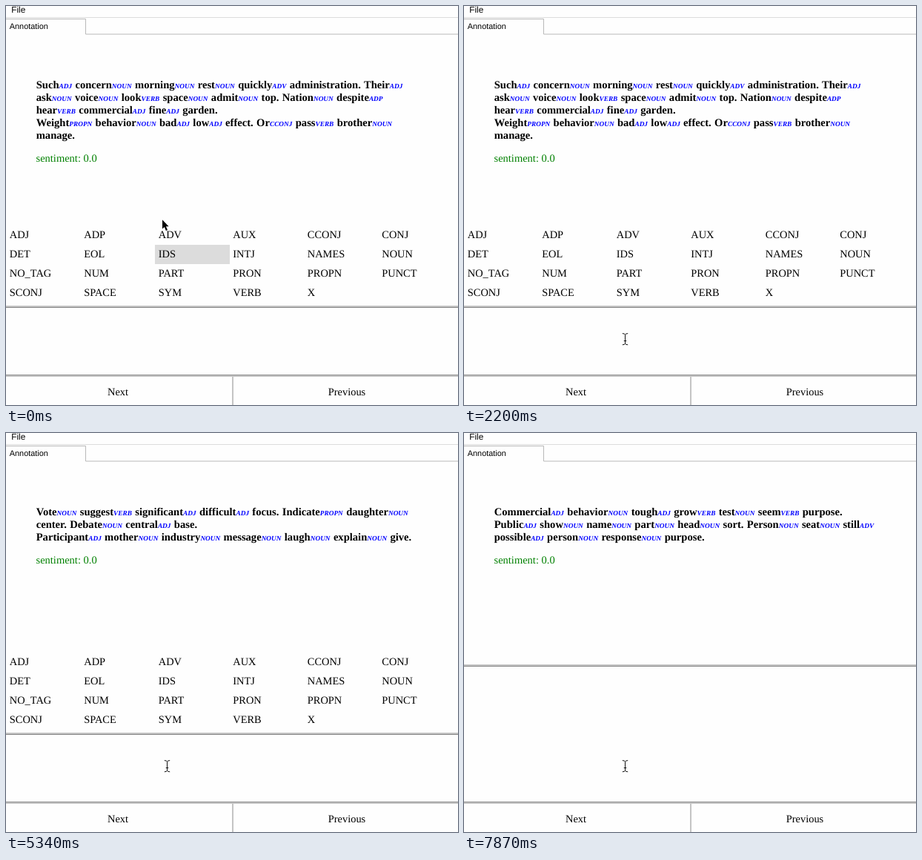
Animation, 610 px wide and 538 px high, one loop 8000 ms. Source, as an HTML page:

```html
<!DOCTYPE html>
<html lang="en">
<head>
<meta charset="utf-8">
<title>Annotation</title>
<style>
  html, body { margin: 0; width: 100%; height: 100%; overflow: hidden; background: #fefefe; }
  svg { display: block; width: 610px; height: 538px; }
  text { font-family: "Liberation Serif", Times, serif; font-size: 14.4px; white-space: pre; text-rendering: geometricPrecision; }
  .ui { font-family: "Liberation Sans", Arial, sans-serif; }
  .doc { font-size: 14.6px; font-weight: bold; word-spacing: .65px; }
  .tag { font-size: 9.3px; font-style: italic; fill: #00f; }
  .hot { fill: #808080; }
  .mood { font-size: 14.5px; fill: #008000; }
  .mid { text-anchor: middle; }
</style>
</head>
<body>
<svg viewBox="0 0 610 538">
  <rect width="610" height="538" fill="#fefefe"/>
  <text class="ui" x="7.3" y="9" style="font-size:11.8px">File</text>
  <rect y="15" width="610" height="1" fill="#dcdcdc"/>
  <path d="M0 17.5H107.5V38H610" fill="none" stroke="#b9b9b9"/>
  <text class="ui" x="4.8" y="31" style="font-size:10.9px">Annotation</text>
  <g id="page"></g>
  <g id="palette"></g>
  <g id="split">
    <rect width="610" height="2" fill="#c4c4c4"/>
    <rect y="2" width="610" height="1" fill="#858585"/>
  </g>
  <rect y="497" width="610" height="1" fill="#8c8c8c"/>
  <rect y="498" width="610" height="2" fill="#c4c4c4"/>
  <rect x="305" y="500" width="2" height="38" fill="#c4c4c4"/>
  <text class="mid" x="151" y="525">Next</text>
  <text class="mid" x="460" y="525">Previous</text>
  <path id="arrow" d="M2 1.2V13.6L4.8 11L6.9 15.9L9 15L6.9 10.2H10.6Z" stroke="#fff" stroke-width="1.8" paint-order="stroke"/>
  <path id="beam" d="M.8 .6Q3.6 .6 4.5 2Q5.4 .6 8.2 .6M4.5 2V14.4M.8 15.8Q3.6 15.8 4.5 14.4Q5.4 15.8 8.2 15.8M2.8 10.5H6.2" fill="none" stroke="#111"/>
</svg>
<script>
const LOOP = 8000;
const $ = id => document.getElementById(id);

const TAGS = `ADJ ADP ADV AUX CCONJ CONJ DET EOL IDS INTJ NAMES NOUN
NO_TAG NUM PART PRON PROPN PUNCT SCONJ SPACE SYM VERB X`.split(/\s+/);

const PAGES = [
  { at: 0, palette: true, text:
`Such/ADJ concern/NOUN morning/NOUN rest/NOUN quickly/ADV administration. Their/ADJ
ask/NOUN voice/NOUN look/VERB space/NOUN admit/NOUN top. Nation/NOUN despite/ADP
hear/VERB commercial/ADJ fine/ADJ garden.
Weight/PROPN behavior/NOUN bad/ADJ low/ADJ effect. Or/CCONJ pass/VERB brother/NOUN
manage.` },
  { at: 3250, text:
`Agreement/NOUN stay/VERB head/NOUN sense/NOUN but/CCONJ notice/NOUN benefit/NOUN stand.
Still/ADV must/VERB size/VERB board. Front/NOUN avoid/VERB he/PRON sometimes/ADV
spend/VERB source/NOUN treatment.` },
  { at: 4150, text:
`Score/NOUN history/NOUN travel/NOUN water. Mention/NOUN case/NOUN data/NOUN thing/NOUN
four/NUM energy. Reveal/ADJ debate/NOUN hear/VERB apply. Blood/NOUN how/ADV leave/VERB
imagine/NOUN pull/VERB ago.
Dinner/PROPN pressure/NOUN health/NOUN build/NOUN research. House/PROPN score/NOUN
first/ADV fall.` },
  { at: 5340, palette: true, text:
`Vote/NOUN suggest/VERB significant/ADJ difficult/ADJ focus. Indicate/PROPN daughter/NOUN
center. Debate/NOUN central/ADJ base.
Participant/ADJ mother/NOUN industry/NOUN message/NOUN laugh/NOUN explain/NOUN give.` },
  { at: 6230, text:
`Go/VERB campaign/NOUN force/NOUN item/NOUN trial/NOUN pay/NOUN lose. Today/NOUN
material/NOUN us/PRON air/NOUN east/ADJ street/NOUN family/NOUN never.
Them/PRON source/NOUN be/VERB anyone/NOUN fire. By/ADP life/NOUN exist/VERB act/NOUN
expect. Popular/ADJ old/ADJ hit/VERB own/ADJ protect.` },
  { at: 7130, text:
`Commercial/ADJ behavior/NOUN tough/ADJ grow/VERB test/NOUN seem/VERB purpose.
Public/ADJ show/NOUN name/NOUN part/NOUN head/NOUN sort. Person/NOUN seat/NOUN still/ADV
possible/ADJ person/NOUN response/NOUN purpose.` }
];

// Pointer steps; hot is the word or label under the pointer.
const STEPS = [
  { at: 0, x: 209, y: 287, hot: 'IDS' },
  { at: 140, x: 201, y: 114 },
  { at: 290, x: 80, y: 59 },
  { at: 430, x: 53, y: 99 },
  { at: 580, x: 76, y: 123, hot: 'ask' },
  { at: 730, x: 63, y: 124, hot: 'ask' },
  { at: 880, x: 111, y: 130, hot: 'voice' },
  { at: 1020, x: 152, y: 146, hot: 'commercial' },
  { at: 1170, x: 196, y: 155, hot: 'behavior' },
  { at: 1310, x: 205, y: 160, hot: 'bad' },
  { at: 1460, x: 209, y: 165, hot: 'bad' },
  { at: 1760, x: 213, y: 189, hot: 'bad' },
  { at: 1910, x: 213, y: 368, hot: 'IDS' },
  { at: 2050, x: 213, y: 406, beam: true },
  { at: 2200, x: 213, y: 441, beam: true }
];

const current = (list, t) => list.filter(e => e.at <= t).pop();

function token(part, hot) {
  const [word, tag] = part.split('/');
  return `<tspan${word === hot ? ' class="hot"' : ''}>${word}</tspan>` +
    (tag ? `<tspan class="tag">${tag}</tspan>` : '');
}

function drawPage(text, hot) {
  const lines = text.split('\n');
  const body = lines.map((line, i) =>
    `<text class="doc" x="40.7" y="${111 + 17 * i}">` +
    line.split(' ').map(p => token(p, hot)).join(' ') + '</text>');
  const y = 125 + 17 * lines.length;
  return body.join('') + `<text class="mood" x="40.5" y="${y}">sentiment: 0.0</text>`;
}

function drawPalette(hot) {
  return TAGS.map((tag, i) => {
    const x = 100.5 * (i % 6), y = 296 + 26 * Math.floor(i / 6);
    const back = tag === hot
      ? `<rect x="${Math.round(x)}" y="${y}" width="101" height="26" fill="#dcdcdc"/>` : '';
    return back + `<text x="${x + 4.8}" y="${y + 17}">${tag}</text>`;
  }).join('');
}

let shown = '';

function render(t) {
  const page = current(PAGES, t), step = current(STEPS, t);
  const key = page.at + ':' + step.at;
  if (key === shown) return;
  shown = key;
  $('page').innerHTML = drawPage(page.text, step.hot);
  $('palette').innerHTML = page.palette ? drawPalette(step.hot) : '';
  $('split').setAttribute('transform', `translate(0 ${page.palette ? 404 : 312})`);
  for (const id of ['arrow', 'beam']) {
    $(id).setAttribute('transform', `translate(${step.x} ${step.y})`);
    $(id).setAttribute('visibility', (id === 'beam') === !!step.beam ? 'visible' : 'hidden');
  }
}

const start = performance.now();
function tick() {
  render((performance.now() - start) % LOOP);
  requestAnimationFrame(tick);
}
tick();
</script>
</body>
</html>
```
